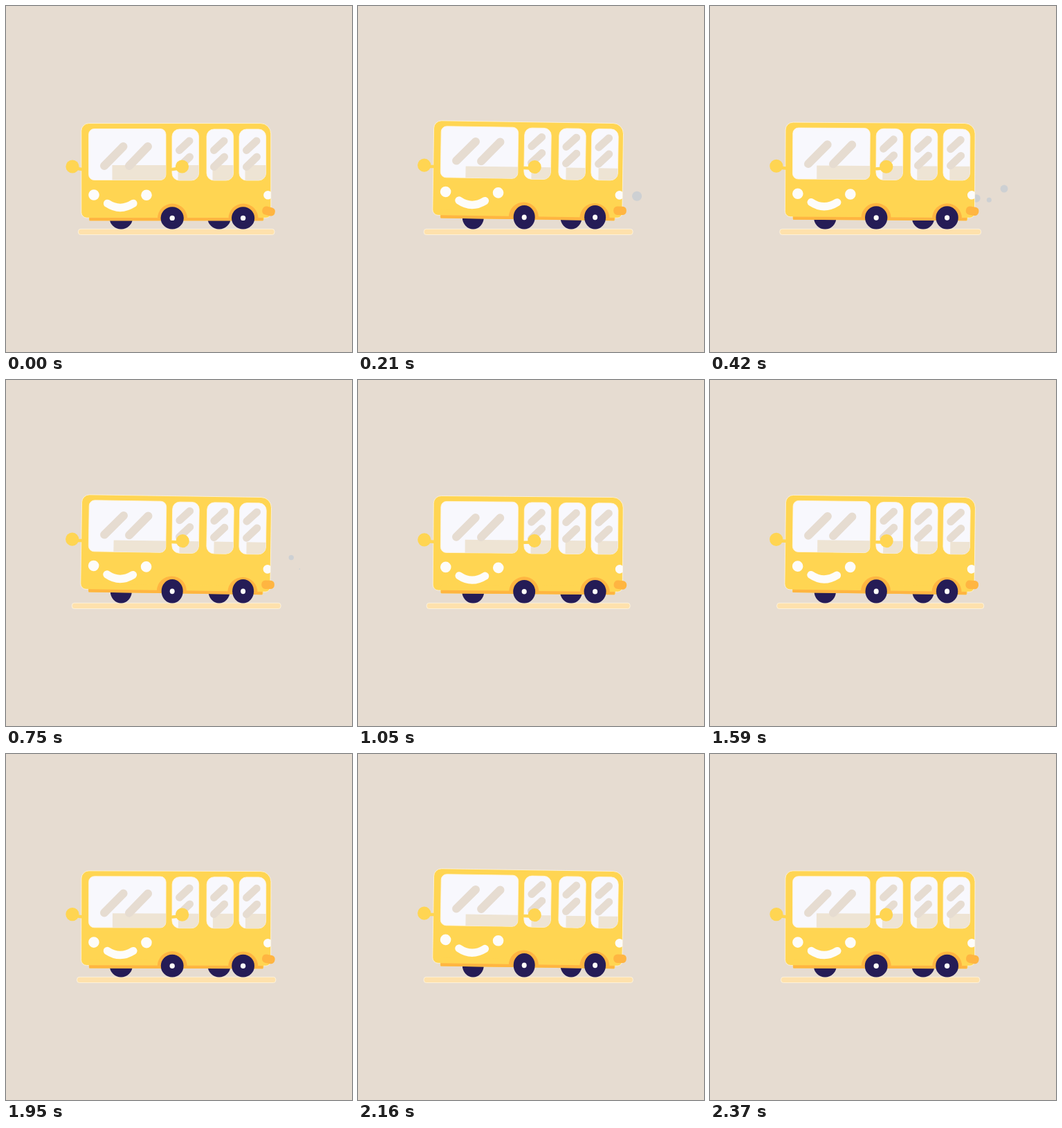
An HTML page with a canvas that plays this animation: 500 px wide and 500 px high, repeating every 2.4 s.

```html
<!DOCTYPE html>
<html lang="en">
<head>
<meta charset="utf-8">
<title>Bouncing bus</title>
<style>
  html, body { margin: 0; width: 100%; height: 100%; overflow: hidden; background: #e6dcd1; }
  canvas { display: block; width: 500px; height: 500px; }
</style>
</head>
<body>
<canvas id="stage" width="500" height="500"></canvas>
<script>
const ctx = document.getElementById('stage').getContext('2d');
const LOOP = 2400, BOUNCE = 480, STEP = 30;
const C = {
  back: '#e6dcd1', yellow: '#ffd552', orange: '#ffb541', navy: '#251c56',
  road: '#fee1ac', glass: '#f8f8fd', seat: '#eee4d4', white: '#fdfcfa',
  smoke: '#cdd0d3', rim: '#fff6e2'
};
const PIVOT = { x: 375, y: 310 };
const TILT = 0.0152;

const windows = [
  { x: 119.5, y: 177.5, w: 111.5, h: 74, r: 8, seat: 34,
    shine: [[142, 231, 169.5, 203], [178, 231, 205, 203]], width: 12 },
  ...[240, 290, 337].map(x => ({
    x, y: 178, w: 38.6, h: 74, r: 10.5, seat: 8.5,
    shine: [[x + 10.5, 208.5, x + 25, 195], [x + 10.5, 232.5, x + 25.5, 218]], width: 11
  }))
];

const puffs = [
  { start: 0, life: 600, dx: 0.9, dy: -0.44, reach: 73.3, r: 7.2 },
  { start: 170, life: 620, dx: 0.945, dy: -0.325, reach: 63, r: 3.6 },
  { start: 285, life: 600, dx: 0.79, dy: -0.615, reach: 63, r: 5.8 }
];

function fill(color) { ctx.fillStyle = color; ctx.fill(); }

function ellipse(x, y, rx, ry, color) {
  ctx.beginPath();
  ctx.ellipse(x, y, rx, ry, 0, 0, Math.PI * 2);
  fill(color);
}

function circle(x, y, r, color) { ellipse(x, y, r, r, color); }

function box(x, y, w, h, r, color) {
  ctx.beginPath();
  ctx.roundRect(x, y, w, h, r);
  fill(color);
}

function line(x1, y1, x2, y2, width, color) {
  ctx.beginPath();
  ctx.moveTo(x1, y1);
  ctx.lineTo(x2, y2);
  ctx.lineCap = 'round';
  ctx.lineWidth = width;
  ctx.strokeStyle = color;
  ctx.stroke();
}

function rim(color) {
  ctx.lineWidth = 0.8;
  ctx.strokeStyle = color;
  ctx.stroke();
}

function drawSmoke(t) {
  for (const p of puffs) {
    const u = (t - p.start) / p.life;
    if (u <= 0 || u >= 1) continue;
    const d = p.reach * u * (2 - u);
    circle(365 + p.dx * d, 293.4 + p.dy * d, p.r * (1 - u ** 4), C.smoke);
  }
}

function drawWheel(x, lift, hub) {
  const ry = 16.2 + 1.1 * lift, y = 322.6 - ry;
  ellipse(x, y, 16.6 - 1.1 * lift, ry, C.navy);
  if (hub) ellipse(x, y, 3.7 - 0.2 * lift, 3.7 + 0.2 * lift, C.white);
}

function drawWindow(win, lift) {
  ctx.save();
  box(win.x, win.y, win.w, win.h, win.r, C.glass);
  rim(C.rim);
  ctx.clip();
  ctx.fillStyle = C.seat;
  ctx.fillRect(win.x + win.seat + 2.2 * lift, 230 + 4.8 * lift, win.w, 40);
  for (const [x1, y1, x2, y2] of win.shine) {
    const dy = -4 * lift;
    line(x1, y1 + dy, x2, y2 + dy, win.width, C.back);
  }
  ctx.restore();
}

function drawMirror(x, dx, dy, side) {
  const mx = x + dx, my = 232 + dy;
  line(mx, my + 2, x + side * 14, 236, 4.5, C.yellow);
  circle(mx, my, 9.6, C.yellow);
}

function drawFace(lift) {
  ctx.save();
  ctx.translate(0.2 * lift, -0.9 * lift);
  circle(127, 273, 7.8, C.white);
  circle(203, 273.3, 7.8, C.white);
  ctx.beginPath();
  ctx.moveTo(146.5, 285.3);
  ctx.quadraticCurveTo(165, 297.5, 184, 285.3);
  ctx.lineCap = 'round';
  ctx.lineWidth = 11.3;
  ctx.strokeStyle = C.white;
  ctx.stroke();
  ctx.restore();
}

function drawBody(lift) {
  ctx.save();
  ctx.translate(PIVOT.x - 1.2 * lift, PIVOT.y);
  ctx.rotate(TILT * lift);
  ctx.translate(-PIVOT.x, -PIVOT.y);

  ctx.save();
  box(108.8, 169.6, 274, 136.6, [11, 15, 7, 8], C.yellow);
  rim(C.rim);
  ctx.clip();
  circle(378.5, 273.3, 6.3, C.white);
  ctx.restore();

  box(120, 298, 252.5, 12.3, 2, C.yellow);
  ctx.fillStyle = C.orange;
  ctx.fillRect(120.5, 306, 251, 4.3);

  for (const x of [240.5, 343]) {
    ctx.beginPath();
    ctx.arc(x, 307, 21.5, Math.PI, 0);
    ctx.closePath();
    fill(C.orange);
  }
  for (const win of windows) drawWindow(win, lift);
  drawFace(lift);
  drawMirror(96, -0.3 * lift, 2.3 * lift, 1);
  drawMirror(254.5, 0.8 * lift, 2.5 * lift, -1);

  ctx.save();
  ctx.translate(379.5, 296.5 - 0.8 * lift);
  ctx.rotate(0.24 * (1 - lift));
  box(-9.3, -6.2, 18.6, 12.4, 5.5, C.orange);
  ctx.restore();
  ctx.restore();
}

function draw(t) {
  const lift = Math.abs(Math.sin(Math.PI * t / BOUNCE));
  ctx.fillStyle = C.back;
  ctx.fillRect(0, 0, 500, 500);

  const half = 141.8 + 9.3 * lift;
  box(246.2 - half, 322.3, half * 2, 8.2, 3.5, C.road);
  rim(C.rim);

  drawSmoke(t);
  drawWheel(166.3, lift, false);
  drawWheel(308, lift, false);
  drawBody(lift);
  drawWheel(240.2, lift, true);
  drawWheel(342.6, lift, true);
}

let begin = null;
function tick(now) {
  if (begin === null) begin = now;
  draw(Math.floor(((now - begin) % LOOP) / STEP) * STEP);
  requestAnimationFrame(tick);
}
draw(0);
requestAnimationFrame(tick);
</script>
</body>
</html>
```
